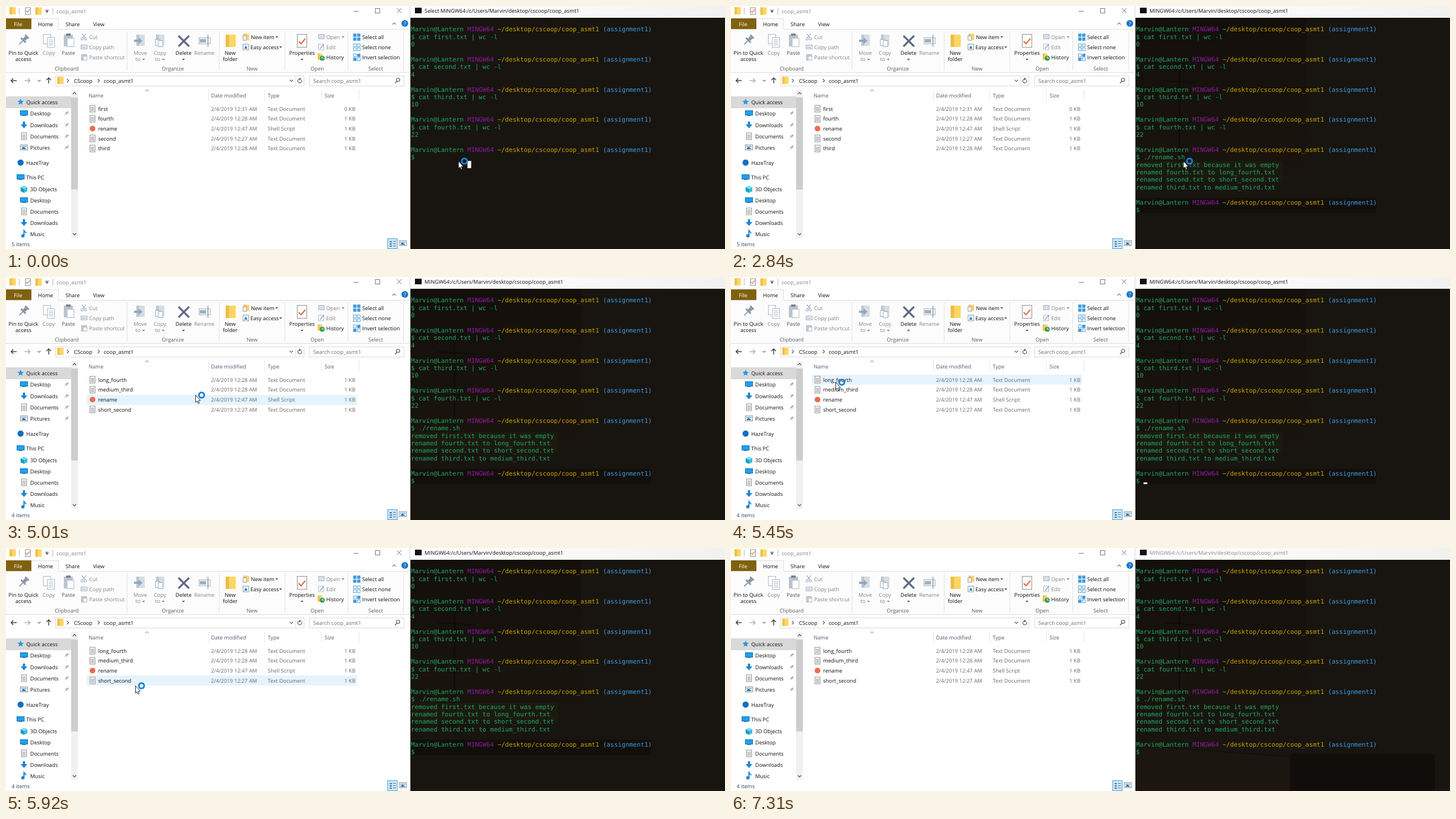
Animation of 1280x433 px, one loop 7340 ms. Source, as an HTML page with a canvas:

```html
<!DOCTYPE html>
<html lang="en">
<head>
<meta charset="utf-8">
<title>Rename script</title>
<style>
html, body { margin: 0; width: 100%; height: 100%; overflow: hidden; background: #fff; }
canvas { display: block; }
</style>
</head>
<body>
<canvas id="stage" width="1280" height="433"></canvas>
<script>
const g = document.getElementById('stage').getContext('2d');
const LOOP = 7340;
const UI = '"Open Sans", "Noto Sans", sans-serif';
const MONO = '"DejaVu Sans Mono", "Liberation Mono", monospace';
const INK = '#111', DIM = '#858585', META = '#686868', LINE = '#dcdcdc';
const BLUE = '#1f86d6', YELLOW = '#fbd667', STEEL = '#a9b6c3';
const GREEN = '#22a864', PURPLE = '#8d1a9d', GOLD = '#c8a200', SKY = '#3d9be3';

// ---------- drawing helpers ----------
function box(x, y, w, h, fill, stroke) {
  if (fill) { g.fillStyle = fill; g.fillRect(x, y, w, h); }
  if (stroke) { g.strokeStyle = stroke; g.lineWidth = 1; g.strokeRect(x + .5, y + .5, w - 1, h - 1); }
}
function path(pts, close) {
  g.beginPath();
  for (let i = 0; i < pts.length; i += 2) g.lineTo(pts[i], pts[i + 1]);
  if (close) g.closePath();
}
function poly(fill, ...pts) { path(pts, true); g.fillStyle = fill; g.fill(); }
function line(color, width, ...pts) {
  path(pts); g.strokeStyle = color; g.lineWidth = width; g.stroke();
}
function disc(x, y, r, fill) {
  g.beginPath(); g.arc(x, y, r, 0, 7); g.fillStyle = fill; g.fill();
}
function ring(x, y, r, color, width, from = 0, to = 7) {
  g.beginPath(); g.arc(x, y, r, from, to);
  g.strokeStyle = color; g.lineWidth = width; g.stroke();
}
// y is the middle of the line of text; baselines sit on whole pixels
function text(s, x, y, color = INK, align = 'left', size = 9.45) {
  g.font = size + 'px ' + UI;
  g.textAlign = align;
  g.fillStyle = color;
  g.fillText(s, x, Math.round(y + 3.5));
}
function chevron(x, y, w, h, color = '#666', width = 1.2) { line(color, width, x - w, y - h, x, y + h, x + w, y - h); }
function caret(x, y, color = '#555') { poly(color, x - 2.5, y - 1, x + 2.5, y - 1, x, y + 2); }

// ---------- icons, placed by their centre ----------
function folder(x, y, w = 11, h = 13) {
  box(x - w / 2, y - h / 2, w, h, YELLOW);
  box(x - w / 2, y - h / 2, w * .35, h, '#f0bd45');
}
function page(x, y, w = 10, h = 13, edge = '#8c8c8c') { box(x - w / 2, y - h / 2, w, h, '#fff', edge); }
function doc(x, y) {
  page(x, y, 10, 13);
  for (let i = -3; i <= 4; i += 2) box(x - 3, y + i, 6, 1, '#9a9a9a');
}
function screen(x, y) {
  box(x - 7, y - 5, 14, 9, '#0c71bd');
  box(x - 6, y - 4, 12, 7, '#21a0ee');
  box(x - 3, y + 4, 6, 1, '#5c7890');
}
function down(x, y) {
  box(x - 2, y - 6, 4, 6, BLUE);
  poly(BLUE, x - 6, y - 1, x + 6, y - 1, x, y + 6);
}
function picture(x, y) {
  box(x - 7, y - 5, 14, 10, '#fff', '#8c8c8c');
  box(x - 5, y - 3, 10, 3, '#8fcdf4');
  poly('#35688e', x - 5, y + 3, x - 1, y - 1, x + 5, y + 3);
}
function star(x, y) {
  const p = [];
  for (let i = 0; i < 10; i++) {
    const a = i * Math.PI / 5 - Math.PI / 2, r = i % 2 ? 2.7 : 6;
    p.push(x + r * Math.cos(a), y + r * Math.sin(a));
  }
  poly('#2b95e0', ...p);
}
function cube(x, y) {
  poly('#7adcf0', x, y - 6, x + 6, y - 3, x, y, x - 6, y - 3);
  poly('#1b9dc0', x - 6, y - 3, x, y, x, y + 7, x - 6, y + 4);
  poly('#36bddb', x + 6, y - 3, x, y, x, y + 7, x + 6, y + 4);
}
function note(x, y) {
  line('#1c84d5', 2, x, y + 4, x, y - 6, x + 4, y - 1);
  disc(x - 2, y + 3.5, 3, '#1c84d5');
}
function pin(x, y, s, color) {
  g.save();
  g.translate(x, y); g.rotate(Math.PI / 4); g.scale(s, s);
  box(-3, -6, 6, 2, color);
  box(-2, -4, 4, 4, color);
  box(-4, 0, 8, 2, color);
  box(-.6, 2, 1.2, 6, color);
  g.restore();
}
function tick(x, y, s, color) { line(color, s / 3, x - s, y, x - s * .3, y + s * .7, x + s, y - s * .8); }
function grid(x, y, mode) {
  for (let i = 0; i < 4; i++) {
    const on = mode === 0 || (mode === 2 && (i === 1 || i === 2));
    box(x - 6 + (i % 2) * 7, y - 6 + (i >> 1) * 7, 6, 6, on ? '#3f9ae0' : '#fff', '#5ba6dc');
  }
}

// ---------- file window ----------
function titleBar() {
  folder(12, 8.5);
  box(23, 3, 1, 12, '#b5b5b5');
  page(39, 9, 10, 13);
  tick(39, 9, 3.5, '#d96a37');
  folder(58, 9);
  line('#333', 1, 70, 7.5, 76, 7.5);
  caret(73, 10, '#333');
  box(83, 3, 1, 12, '#b5b5b5');
  text('coop_asmt1', 90, 9, '#858585');
  line('#777', 1, 619, 9.5, 628, 9.5);
  box(657, 4, 9, 9, null, '#777');
  line('#777', 1, 696, 4, 704, 12.5);
  line('#777', 1, 704, 4, 696, 12.5);
}
function tabs() {
  box(0, 22, 45, 19, '#80610f');
  text('File', 14, 32, '#fff');
  box(0, 41, 718, 1, LINE);
  box(45, 22, 49, 20, '#fcfcfc');
  line(LINE, 1, 45.5, 41, 45.5, 22.5, 93.5, 22.5, 93.5, 41);
  text('Home', 57, 32);
  text('Share', 106, 32);
  text('View', 155, 32);
  line('#777', 1.2, 688, 33, 691, 30, 694, 33);
  disc(710, 31, 6, '#1976c8');
  text('?', 710, 31, '#fff', 'center');
}
function bigButton(x, a, b, color) {
  text(a, x, 83, color, 'center');
  if (b) text(b, x, 94, color, 'center');
}
function ribbon() {
  box(0, 42, 718, 76, '#fcfcfc');
  box(0, 118, 718, 1, LINE);
  for (const x of [215, 379, 496, 608, 707]) box(x, 45, 1, 70, '#e2e2e2');
  [['Clipboard', 108], ['Organize', 297], ['New', 438], ['Open', 554], ['Select', 658]]
    .forEach(([s, x]) => text(s, x, 111, '#5c5c5c', 'center'));

  pin(32, 60, 1.5, '#8795a3');
  bigButton(31, 'Pin to Quick', 'access', INK);
  page(73, 59, 14, 18, STEEL);
  page(80, 65, 14, 18, STEEL);
  for (let i = 0; i < 4; i++) box(76, 60 + i * 3, 8, 1, STEEL);
  bigButton(76, 'Copy', '', DIM);
  box(103, 51, 16, 21, '#b9c3cd');
  box(107, 49, 8, 4, '#76838f');
  page(115, 65, 13, 16, STEEL);
  bigButton(111, 'Paste', '', '#555');

  line(STEEL, 1.3, 135, 49, 141, 57);
  line(STEEL, 1.3, 142, 49, 136, 57);
  ring(135.5, 58.5, 2, STEEL, 1.2);
  ring(141.5, 58.5, 2, STEEL, 1.2);
  box(133, 69, 12, 8, '#e3e8ed', STEEL);
  box(135, 73, 7, 1, STEEL);
  box(134, 86, 10, 11, '#c3cbd3', STEEL);
  page(141, 93, 7, 8, STEEL);
  text('Cut', 148, 55, DIM);
  text('Copy path', 148, 73, DIM);
  text('Paste shortcut', 148, 91, DIM);

  for (const x of [239, 274]) {
    box(x - 7, 51, 15, 20, '#d6dde3');
    box(x - 7, 51, 5, 20, '#bcc7d0');
    caret(x + 6, 95, DIM);
  }
  poly('#8fa8bf', 228, 60, 236, 60, 236, 56, 243, 62, 236, 68, 236, 64, 228, 64);
  page(270, 65, 9, 12, '#8fa8bf');
  page(275, 67, 9, 12, '#8fa8bf');
  bigButton(239, 'Move', '', DIM);
  text('to', 235, 94, DIM, 'center');
  bigButton(274, 'Copy', '', DIM);
  text('to', 270, 94, DIM, 'center');

  line('#5d6b80', 3.4, 307, 53, 326, 72);
  line('#5d6b80', 3.4, 326, 53, 307, 72);
  bigButton(316, 'Delete', '', INK);
  caret(316, 95);
  box(343, 56, 21, 12, '#eef1f4', STEEL);
  box(345, 59, 11, 6, '#9fb0c0');
  line('#7f8f9f', 1.2, 359.5, 51, 359.5, 73);
  bigButton(353, 'Rename', '', DIM);

  folder(400, 62, 18, 22);
  bigButton(399, 'New', 'folder', INK);
  folder(428, 55, 10, 11);
  page(425, 57, 7, 9);
  text('New item', 436, 55);
  caret(482, 55);
  page(427, 73, 11, 11);
  poly(BLUE, 424, 76, 430, 76, 427, 70);
  text('Easy access', 435, 73);
  caret(489, 73);

  page(527, 62, 18, 24, '#8d8d8d');
  tick(527, 63, 6, '#e0632b');
  bigButton(527, 'Properties', '', INK);
  caret(527, 95);
  box(556, 50, 11, 9, '#d7dfe7', STEEL);
  text('Open', 570, 55, DIM);
  caret(600, 55, DIM);
  page(561, 73, 10, 11, STEEL);
  line('#8fa0b0', 1.5, 559, 76, 566, 68);
  text('Edit', 570, 73, DIM);
  folder(559, 90, 8, 11);
  disc(563, 93, 4.6, '#3d9b50');
  line('#fff', 1, 563, 90, 563, 93, 566, 93);
  text('History', 570, 91);

  ['Select all', 'Select none', 'Invert selection'].forEach((s, i) => {
    grid(624, 55 + i * 18, i);
    text(s, 634, 55 + i * 18);
  });
}
function arrow(x, y, dx, dy, color) {
  line(color, 1.4, x - dx * 5, y - dy * 5, x + dx * 5, y + dy * 5);
  line(color, 1.4, x + dx + dy * 4, y + dy + dx * 4, x + dx * 5, y + dy * 5, x + dx - dy * 4, y + dy - dx * 4);
}
function addressBar() {
  arrow(14, 133, -1, 0, '#333');
  arrow(38, 133, 1, 0, '#aaa');
  chevron(59, 133, 2.5, 1.2, '#777');
  arrow(76, 133, 0, -1, '#333');
  box(88, 124, 443, 19, '#fff', '#d9d9d9');
  box(515, 125, 1, 17, '#e2e2e2');
  folder(97, 132.5, 11, 13);
  for (const x of [110, 165]) line('#555', 1.1, x - 1.5, 130, x + 1.5, 133, x - 1.5, 136);
  text('CScoop', 121, 133);
  text('coop_asmt1', 174, 133);
  chevron(508, 133, 3, 1.5);
  ring(523, 133.5, 3.4, '#666', 1.2, -.6, 4.7);
  poly('#666', 522, 127.5, 526, 130, 522, 132.5);
  box(540, 124, 169, 19, '#fff', '#d9d9d9');
  text('Search coop_asmt1', 547, 133, '#6f6f6f');
  ring(698, 131.5, 3, '#555', 1.2);
  line('#555', 1.5, 696, 134, 692.5, 137.5);
}
const places = [
  ['Quick access', 171, star], ['Desktop', 191, screen, 1], ['Downloads', 212, down, 1],
  ['Documents', 232, doc, 1], ['Pictures', 252, picture, 1],
  ['HazeTray', 279, (x, y) => disc(x, y, 5.5, '#0f6fc5')], ['This PC', 305, screen],
  ['3D Objects', 326, cube, 1], ['Desktop', 346, screen, 1], ['Documents', 366, doc, 1],
  ['Downloads', 386, down, 1], ['Music', 406, note, 1]
];
function sidebar() {
  box(0, 161, 116, 21, '#d9d9d9');
  places.forEach(([name, y, icon, deep], i) => {
    icon(deep ? 32 : 26, y);
    text(name, deep ? 43 : 36, y);
    if (i > 0 && i < 5) pin(108, y, .6, '#98a2ab');
  });
  box(116, 150, 12, 263, '#f1f1f1');
  box(116, 163, 12, 164, '#cdcdcd');
  line('#555', 1.3, 119, 157, 122, 154, 125, 157);
  chevron(122, 406.5, 3, 1.5, '#555', 1.3);
}
const before = [['first', '31', 0], ['fourth', '28', 1], ['rename', '47', 1], ['second', '27', 1], ['third', '28', 1]];
const after = [['long_fourth', '28', 1], ['medium_third', '28', 1], ['rename', '47', 1], ['short_second', '27', 1]];
const ROW = 17.6, TOP = 174.4;
function fileList(files, mouse) {
  line('#777', 1, 248, 152, 251, 149, 254, 152);
  [['Name', 147], ['Date modified', 365], ['Type', 466], ['Size', 567]]
    .forEach(([s, x]) => text(s, x, 159, '#4d5d72'));
  for (const x of [360, 460, 561, 628]) box(x, 149, 1, 20, '#e6e6e6');
  const hover = mouse[0] > 144 && mouse[0] < 626 ? Math.floor((mouse[1] - TOP) / ROW) : -1;
  files.forEach(([name, minute, kb], i) => {
    const y = 183.2 + i * ROW, script = name === 'rename';
    if (i === hover) box(144, Math.round(TOP + i * ROW), 481, 18, '#e5f3ff');
    if (script) disc(154, y, 5, '#ee6a4c');
    else doc(154, Math.round(y));
    text(name, 164, y);
    text(`2/4/2019 12:${minute} AM`, 365, y, META, 'left', 9.35);
    text(script ? 'Shell Script' : 'Text Document', 466, y, META);
    text(kb + ' KB', 622, y, META, 'right');
  });
}
function explorer(files, mouse) {
  box(0, 0, 720, 433, '#fff');
  titleBar();
  tabs();
  ribbon();
  addressBar();
  sidebar();
  fileList(files, mouse);
  text(files.length + ' items', 10, 424, '#33445a');
  box(679, 414, 18, 19, '#cce8ff', '#4aa0dc');
  for (let i = 0; i < 3; i++) {
    box(683, 419 + i * 4, 4, 2, '#4b6f8f');
    box(689, 419 + i * 4, 5, 1, '#4b6f8f');
  }
  picture(706.5, 422.5);
  box(718, 0, 1, 433, '#ececec');
}

// ---------- terminal ----------
const CELL = 6.7, PITCH = 13.4;
const cellX = col => 721 + col * CELL;
const baseY = row => Math.round(45.3 + row * PITCH);
function put(row, col, s, color = GREEN) {
  g.font = '11.1px ' + MONO;
  g.textAlign = 'left';
  g.fillStyle = color;
  for (let i = 0; i < s.length; i++) if (s[i] !== ' ') g.fillText(s[i], cellX(col + i), baseY(row));
}
function prompt(row) {
  put(row, 0, 'Marvin@Lantern');
  put(row, 15, 'MINGW64', PURPLE);
  put(row, 23, '~/desktop/cscoop/coop_asmt1', GOLD);
  put(row, 51, '(assignment1)', SKY);
}
const counts = [['first', '0'], ['second', '4'], ['third', '10'], ['fourth', '22']];
const command = './rename.sh';
const keyTimes = [250, 280, 450, 480, 650, 720, 1170, 1250, 1620, 1810, 1930];
const output = [
  [2440, 'removed first.txt because it was empty'],
  [2530, 'renamed fourth.txt to long_fourth.txt'],
  [2620, 'renamed second.txt to short_second.txt'],
  [2710, 'renamed third.txt to medium_third.txt']
];
// the caret turns on and off at these times, starting hidden
const blinks = [300, 450, 500, 650, 800, 1170, 1320, 1810, 1870, 1930, 1980, 2440,
  3360, 3880, 4400, 4930, 5400, 5900, 6380, 6820];
const passed = (times, t) => times.filter(x => x <= t).length;

function backdrop(t) {
  box(720, 21, 560, 412, '#181510');
  if (t < 250) return;
  const shade = g.createLinearGradient(0, 21, 0, 290);
  shade.addColorStop(0, '#130f0b');
  shade.addColorStop(1, '#19140d');
  box(721, 21, 303, 269, shade);
  const dark = '#0f0c09';
  box(797, 100, 3, 190, dark);
  line(dark, 2, 766, 108, 830, 112);
  line(dark, 2, 768, 133, 828, 137);
  if (t >= 2440 && t < 7310) box(721, 276, 261, 34, '#1b1a10');
  if (t >= 2780 && t < 7310) box(721, 342, 428, 27, '#120f0b');
  if (t >= 6640) box(996, 367, 257, 66, '#100d0a');
  if (t >= 7310) {
    poly('#1b160f', 721, 352, 995, 372, 995, 433, 721, 433);
    line('#120e0a', 1.5, 721, 352, 995, 372);
  }
}
function terminal(t) {
  backdrop(t);
  const bar = g.createLinearGradient(720, 0, 1280, 0);
  bar.addColorStop(0, '#fdfdfd');
  bar.addColorStop(.5, '#f9f9f8');
  bar.addColorStop(1, '#f1f1ef');
  box(720, 0, 560, 21, bar);
  box(728, 3, 12, 10, '#111');
  const title = 'MINGW64:/c/Users/Marvin/desktop/cscoop/coop_asmt1';
  text((t < 250 ? 'Select ' : '') + title, 745, 8.5, t < 7310 ? INK : '#8a8a8a');
  box(719, 0, 1, 433, '#e6e2de');

  counts.forEach(([name, n], i) => {
    prompt(i * 4);
    put(i * 4 + 1, 0, `$ cat ${name}.txt | wc -l`);
    put(i * 4 + 2, 0, n);
  });
  const typed = passed(keyTimes, t);
  prompt(16);
  put(17, 0, '$ ' + command.slice(0, typed));
  output.forEach(([at, s], i) => { if (t >= at) put(18 + i, 0, s); });
  if (t >= 2780) prompt(23);
  if (t >= 2840) put(24, 0, '$');

  if (t < 250) box(821.5, 276, 6.7, 13, '#f0f0f0');
  if (passed(blinks, t) % 2) {
    const [row, col] = t >= 2840 ? [24, 2] : t >= 2350 ? [18, 0] : [17, 2 + typed];
    box(cellX(col), baseY(row) - 1, CELL, 3, '#f2f2f2');
  }
}

// ---------- pointer: time, x, y ----------
const track = [
  [0, 805, 276], [4220, 805, 276], [4240, 803, 275], [4400, 803, 275], [4550, 728, 266],
  [4850, 465, 229], [5010, 338, 210], [5130, 244, 186], [5280, 196, 179], [5450, 186, 187],
  [5680, 206, 217], [5870, 228, 243], [5920, 229, 244.5], [6050, 300, 275],
  [6350, 760, 350], [6630, 1232, 418], [6820, 1250, 450], [LOOP, 1250, 450]
];
function mouseAt(t) {
  const i = track.findIndex(p => p[0] > t);
  const a = track[i - 1], b = track[i], k = (t - a[0]) / (b[0] - a[0]);
  return [a[1] + (b[1] - a[1]) * k, a[2] + (b[2] - a[2]) * k];
}
function pointer([x, y]) {
  g.save();
  g.translate(Math.round(x), Math.round(y));
  path([.5, .5, .5, 13.5, 3.3, 11, 5.3, 15.5, 7.2, 14.6, 5.3, 10.3, 9.2, 10], true);
  g.fillStyle = '#fff'; g.fill();
  g.strokeStyle = '#111'; g.lineWidth = .9; g.stroke();
  ring(11.2, .5, 4.7, '#1b80d4', 3);
  g.restore();
}

function draw(now) {
  const t = now % LOOP;
  const mouse = mouseAt(t);
  g.textRendering = 'geometricPrecision';
  explorer(t < 3450 ? before : after, mouse);
  terminal(t);
  if (t < 6820) pointer(mouse);
}
const start = performance.now();
function frame() {
  draw(performance.now() - start);
  requestAnimationFrame(frame);
}
frame();
</script>
</body>
</html>
```
